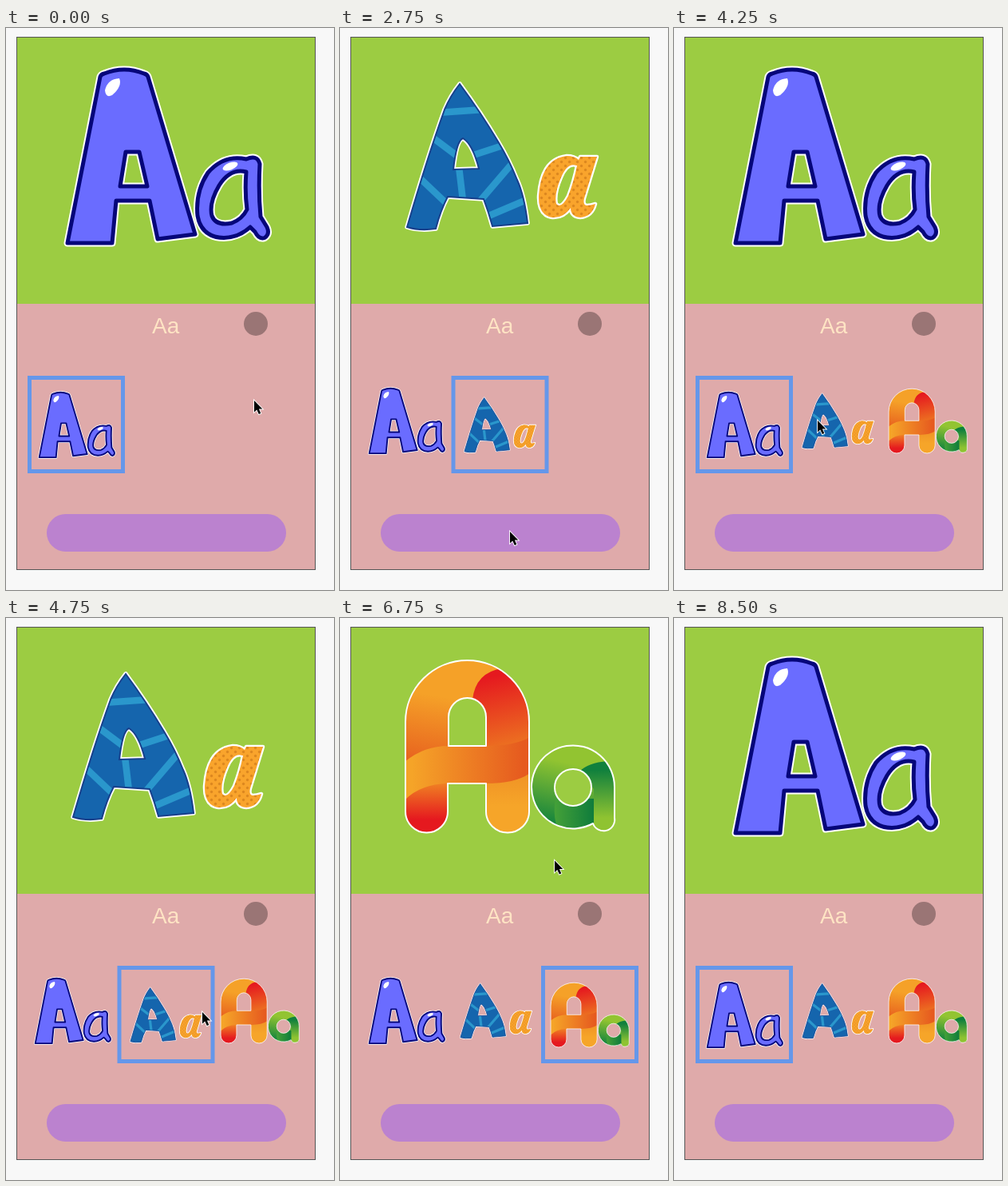
Animation, 411 px wide and 703 px high, one loop 9.75 s. Source, as an HTML page:

```html
<!DOCTYPE html>
<html lang="en">
<head>
<meta charset="utf-8">
<title>Letter carousel</title>
<style>
html, body { margin: 0; height: 100%; overflow: hidden; background: #f8f8f8; }
svg { display: block; width: 100vw; height: 100vh; }
.rim { fill: none; stroke: #fff; stroke-linejoin: round; }
</style>
</head>
<body>
<svg viewBox="0 0 411 703">
  <defs>
    <linearGradient id="arch" gradientUnits="userSpaceOnUse" x1="120" y1="60" x2="100" y2="180">
      <stop offset=".3" stop-color="#f5a128"/><stop offset="1" stop-color="#e8631f"/>
    </linearGradient>
    <linearGradient id="red" gradientUnits="userSpaceOnUse" x1="195" y1="72" x2="215" y2="158">
      <stop stop-color="#e5191f"/><stop offset="1" stop-color="#ec6f21"/>
    </linearGradient>
    <linearGradient id="bar" gradientUnits="userSpaceOnUse" x1="90" y1="0" x2="230" y2="0">
      <stop stop-color="#f5a428"/><stop offset="1" stop-color="#e65a1f"/>
    </linearGradient>
    <linearGradient id="footL" gradientUnits="userSpaceOnUse" x1="0" y1="205" x2="0" y2="252">
      <stop stop-color="#f08423"/><stop offset="1" stop-color="#e5191f"/>
    </linearGradient>
    <linearGradient id="footR" gradientUnits="userSpaceOnUse" x1="0" y1="195" x2="0" y2="235">
      <stop stop-color="#f09325"/><stop offset="1" stop-color="#f6a529"/>
    </linearGradient>
    <linearGradient id="leaf" gradientUnits="userSpaceOnUse" x1="280" y1="180" x2="262" y2="256">
      <stop stop-color="#92c431"/><stop offset="1" stop-color="#14843d"/>
    </linearGradient>
    <linearGradient id="leafLow" gradientUnits="userSpaceOnUse" x1="268" y1="0" x2="318" y2="0">
      <stop stop-color="#45a138"/><stop offset="1" stop-color="#0f7c3c"/>
    </linearGradient>
    <linearGradient id="stem" gradientUnits="userSpaceOnUse" x1="0" y1="190" x2="0" y2="250">
      <stop stop-color="#10803d"/><stop offset="1" stop-color="#8fc331"/>
    </linearGradient>
    <pattern id="dots" width="10" height="10" patternUnits="userSpaceOnUse">
      <rect width="10" height="10" fill="#f9a42c"/>
      <g fill="#dc871f"><circle cx="2.5" cy="2.5" r="1.7"/><circle cx="7.5" cy="7.5" r="1.7"/></g>
    </pattern>

    <path id="plainShape" fill-rule="evenodd" d="M77,269 L118,61 Q119,58 123,57 Q148,47 173,57 Q177,58 178,61 L237,258 L190,264 L180,216 H138 L133,269Z M150,155 H167 L177,198 H143Z
      M301,164 Q315,158 318,170 Q316,205 319,236 L327,249 Q331,258 324,262.500 Q317,265 312,255 L306,249 Q292,262 273,262.500 Q245,262 240,235 Q237,205 253,181 Q273,158 301,164Z
      M301,180 Q281,175 267,197 Q254,219 258,235 Q263,248 283,244 Q296,239 302,227 Q299,205 301,180Z"/>
    <path id="stripedShape" fill-rule="evenodd" d="M150,70 Q138,85 131,102 Q110,160 84,249 Q100,254 120,251 Q126,228 135,211 L180,214 Q186,230 191,248 L235,244 Q231,210 222,190 Q212,165 198,142 Q176,105 150,70Z M154,138 Q146,141 142,177 L174,176 Q166,145 154,138Z"/>
    <path id="dottedShape" fill-rule="evenodd" d="M322,161 L306,213 Q304,221 309,222 Q314,222 320,220 Q316,236 301,237 Q289,236 289,225 Q280,238 266,237 Q248,234 249,210 Q252,164 284,160 Q294,160 299,165 L301,161Z M296,172 Q285,168 277,187 Q268,208 271,220 Q277,227 286,210 Q293,192 297,172Z"/>
    <path id="ribbonShape" clip-rule="evenodd" d="M82,130 A77.500 77 0 0 1 237,130 V242 A27 26.500 0 0 1 183,242 V207 H135 V242 A26.500 26.500 0 0 1 82,242Z M136,160 V124 A23.500 24 0 0 1 183,124 V160Z"/>
    <path id="leafShape" clip-rule="evenodd" d="M344,212 V250 A14 14 0 0 1 317,257 A52 52 0 1 1 344,212Z M269,212 a23,23 0 1 0 46,0 a23,23 0 1 0 -46,0Z"/>
    <clipPath id="stripedClip"><use href="#stripedShape" clip-rule="evenodd"/></clipPath>
    <clipPath id="ribbonClip"><use href="#ribbonShape"/></clipPath>
    <clipPath id="leafClip"><use href="#leafShape"/></clipPath>
    <clipPath id="panel"><rect x="14" y="12" width="373" height="333"/></clipPath>

    <g id="letter0">
      <use href="#plainShape" class="rim" stroke-width="9"/>
      <use href="#plainShape" fill="#6a6cff" stroke="#06067a" stroke-width="5" stroke-linejoin="round"/>
      <path fill="#fff" d="M142,63 Q146,73 133,84 Q125,88 124,78 Q127,64 142,63Z"/>
      <ellipse fill="#fff" rx="10" ry="4.500" transform="translate(281 173) rotate(-22)"/>
    </g>
    <g id="letter1" transform="translate(-3.500 0)">
      <use href="#stripedShape" class="rim" stroke-width="5.500"/>
      <use href="#stripedShape" fill="#1565ad"/>
      <path clip-path="url(#stripedClip)" fill="none" stroke="#2a97cc" stroke-width="8.500" d="M122,106 L180,102 M112,134 L148,161 M164,160 L210,145 M96,184 L134,220 M149,174 L154,216 M174,218 L216,169 M184,236 L238,213"/>
      <use href="#stripedShape" fill="none" stroke="#173f8c" stroke-width="2"/>
      <use href="#dottedShape" class="rim" stroke-width="4.500"/>
      <use href="#dottedShape" fill="url(#dots)"/>
    </g>
    <g id="letter2">
      <g clip-path="url(#ribbonClip)">
        <path fill="url(#arch)" d="M80,50 H240 V190 H80Z"/>
        <path fill="url(#red)" d="M166,102 Q170,68 203,63 H240 V170 H183 V124 Q180,106 166,102Z"/>
        <path fill="url(#footL)" d="M80,190 H137 V270 H80Z"/>
        <path fill="url(#footR)" d="M182,190 H240 V270 H182Z"/>
        <path fill="url(#bar)" d="M81,180 Q105,160 136,160 H183 Q220,160 238,149 V194 Q220,207 183,207 H135 Q100,208 81,228Z"/>
      </g>
      <use href="#ribbonShape" class="rim" stroke-width="2"/>
      <g clip-path="url(#leafClip)">
        <path fill="url(#leaf)" d="M238,158 H346 V266 H238Z"/>
        <path fill="url(#leafLow)" d="M270,226 Q266,250 274,266 H318 V226Z"/>
        <path fill="url(#stem)" d="M300,192 Q311,181 335,179 H346 V266 H318 V214Z"/>
      </g>
      <use href="#leafShape" class="rim" stroke-width="2"/>
    </g>
  </defs>

  <rect x="13" y="11" width="375" height="335" fill="#9ccc42"/>
  <rect x="13" y="345" width="375" height="333" fill="#dfaaaa"/>
  <g clip-path="url(#panel)"><g id="pages"></g></g>
  <text x="183" y="382" font-family="'Liberation Sans', Arial, sans-serif" font-size="28" fill="#ffe4c4">Aa</text>
  <circle cx="313" cy="370" r="15" fill="#9a7575"/>
  <rect x="51" y="608" width="300" height="47" rx="23.500" fill="#bb82cf"/>
  <g id="thumbs"></g>
  <rect id="box" x="29.500" y="437.500" width="117" height="117" fill="none" stroke="#6597ea" stroke-width="5"/>
  <rect x="13.500" y="11.500" width="374" height="666" fill="none" stroke="#555"/>
  <path id="cursor" d="M0,0 V14.500 L3.300,11.400 L5.800,17 L8.300,16 L5.900,10.500 H10.300Z" stroke="#fff" paint-order="stroke" stroke-width="1.800"/>
</svg>
<script>
const LOOP = 9750, STEP = 250, PAGE = 375, SLIDE = 507;
// Selections: time, item
const picks = [[2350, 1], [2850, 2], [3600, 0], [4350, 1], [4850, 2], [7100, 1], [7600, 0]];
const addTimes = [0, 2250, 2850];
const thumbX = [7.8, 120.7, 228.3];
// Pointer route: time, x, y
const route = [
  [0, 311, 466], [250, 321, 474], [500, 302, 516], [1000, 211, 600], [1250, 188, 607],
  [1750, 213, 630], [3000, 213, 630], [3250, 190, 548], [3750, 90, 495], [4250, 180, 491],
  [4500, 182, 491], [5000, 310, 495], [5500, 216, 229], [5750, 150, 160], [6000, 60, 110],
  [6250, 160, 14], [6500, 356, 110], [7000, 182, 497], [7250, 182, 497], [7500, 42, 497],
  [7750, 42, 497], [8250, 132, 418]
];

const get = id => document.getElementById(id);
const move = (el, x, y) => el.setAttribute('transform', `translate(${x} ${y})`);
const show = (el, on) => el.setAttribute('visibility', on ? 'visible' : 'hidden');
const pages = get('pages'), thumbs = get('thumbs'), box = get('box'), cursor = get('cursor');

for (let i = 0; i < 3; i++) {
  pages.innerHTML += `<use href="#letter${i}" x="${i * PAGE}"/>`;
  thumbs.innerHTML += `<g><use href="#letter${i}" transform="scale(.375)"/></g>`;
}

function carousel(t) {
  let item = 0, pos = 0;
  for (const [start, next] of picks) {
    if (t < start) break;
    const left = Math.max(0, 1 - (t - start) / SLIDE) ** 3;
    pos = next + (item - next) * left;
    item = next;
  }
  return { item, pos };
}

function pointer(t) {
  const k = route.findIndex(p => p[0] > t);
  if (k < 0) return route.at(-1).slice(1);
  const [t0, x0, y0] = route[k - 1], [t1, x1, y1] = route[k];
  const f = (t - t0) / (t1 - t0);
  return [x0 + (x1 - x0) * f, y0 + (y1 - y0) * f];
}

function draw(t) {
  const { item, pos } = carousel(t);
  move(pages, -pos * PAGE, 0);
  [...thumbs.children].forEach((thumb, i) => {
    const shift = i === item ? 5 : i > item ? 10 : 0;
    move(thumb, thumbX[i] + shift, i === item ? 436.3 : 431.3);
    show(thumb, t >= addTimes[i]);
  });
  move(box, item * 112.5, 0);
  move(cursor, ...pointer(t));
  show(cursor, t < 8500);
}

const begin = performance.now();
function tick() {
  const t = (performance.now() - begin) % LOOP;
  draw(Math.floor(t / STEP) * STEP);
  requestAnimationFrame(tick);
}
tick();
</script>
</body>
</html>
```
